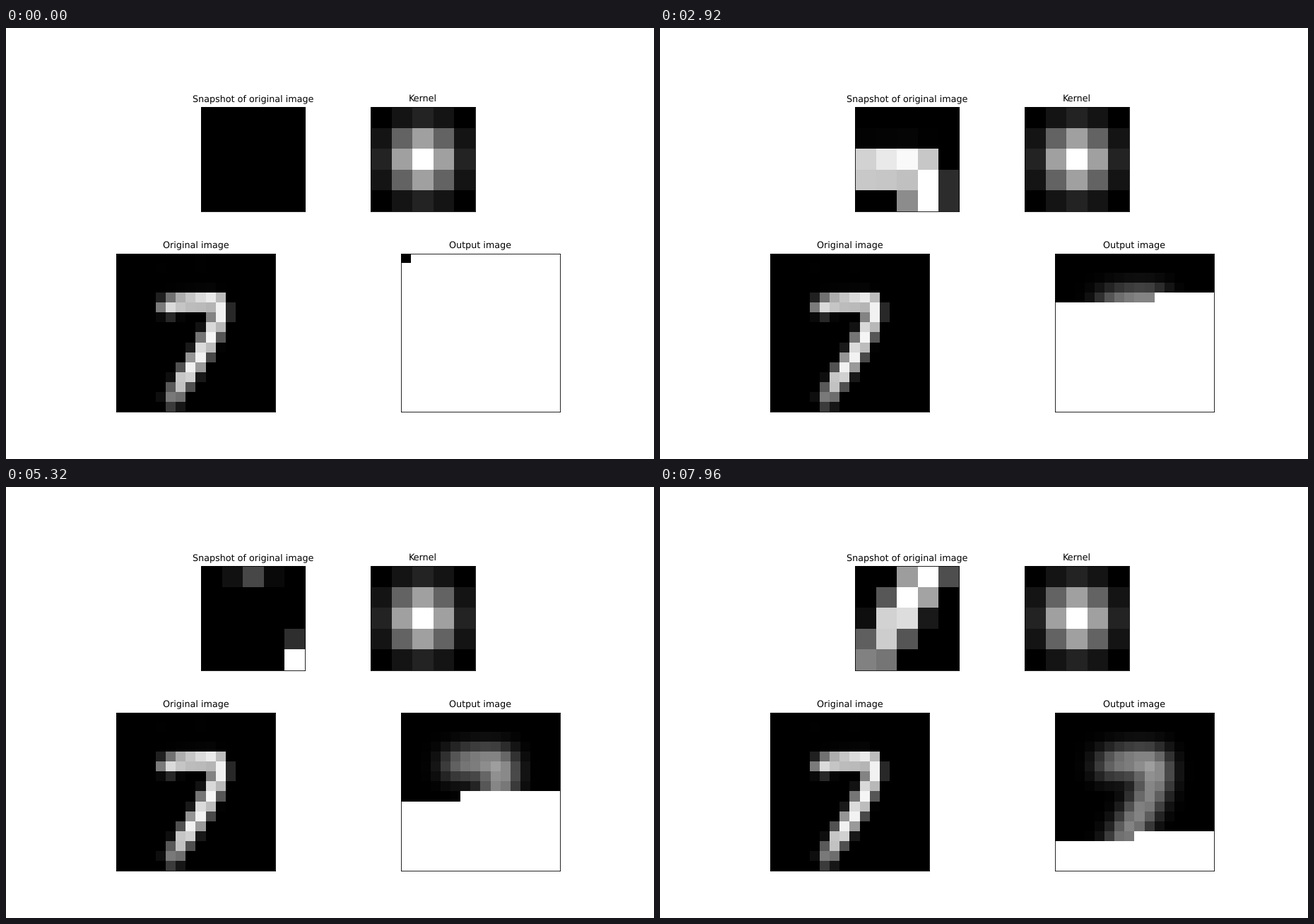
These frames come from a looping animation (917x611 px, 8000 ms). A matplotlib script:

```python
import numpy as np
import matplotlib.pyplot as plt
from matplotlib.animation import FuncAnimation

W, H, DPI = 917, 611, 64
PT = W / 12 / DPI          # scales point sizes of a 12 inch wide layout
N, FRAMES, STEP_MS = 16, 200, 40

plt.rcParams.update({
    "font.family": "DejaVu Sans",
    "axes.titlesize": 12 * PT,
    "axes.titlepad": 6.8 * PT,
    "axes.linewidth": 0.8 * PT,
    "text.hinting": "none",
})


def draw_seven():
    """A pen stroke along key points (column, row, ink) with a soft edge."""
    path = np.array([
        (4.75, 4.9, 0.9), (6.2, 4.52, 0.95), (8, 4.42, 1.05),
        (9.5, 4.35, 1.1), (9.85, 4.9, 1), (9.85, 6, 1),
        (8.95, 8, 1), (7.85, 10, 1), (6.5, 12, 1), (5.2, 14.2, 0.5),
    ])
    t = np.linspace(0, len(path) - 1, 500)
    x, y, ink = (np.interp(t, range(len(path)), k) for k in path.T)
    rows, cols = np.mgrid[:N, :N, :1][:2]
    dist2 = (cols - x) ** 2 + (rows - y) ** 2
    edge = np.clip(1 - dist2 / 1.5 ** 2, 0, 1) ** 2
    image = np.minimum((245 * ink * edge).max(axis=2), 255)
    # faint traces above the bar, seen only when a window is stretched
    image[:2, 8] = image[1, 4] = 1
    image[3, 4:10] = np.arange(6)
    return image


digit = draw_seven()
padded = np.pad(digit, 2)

bell = np.exp(-np.arange(-2, 3) ** 2 / (2 * 1.05 ** 2))
kernel = np.outer(bell, bell)
kernel /= kernel.sum()


def window(i):
    r, c = divmod(i, N)
    return padded[r:r + 5, c:c + 5]


blurred = np.array([(window(i) * kernel).sum() for i in range(N * N)])

fig = plt.figure(figsize=(W / DPI, H / DPI), dpi=DPI, facecolor="white")


def panel(title, cx, cy, size, data, vmin=None, vmax=None):
    """Square image panel centred at (cx, cy), in pixels from the top left."""
    ax = fig.add_axes([(cx - size / 2) / W, 1 - (cy + size / 2) / H,
                       size / W, size / H])
    ax.set_title(title)
    ax.set_xticks([])
    ax.set_yticks([])
    return ax.imshow(data, cmap="gray", vmin=vmin, vmax=vmax,
                     interpolation="nearest", aspect="auto")


snap = panel("Snapshot of original image", 349.6, 185.9, 147.6, window(0))
panel("Kernel", 590.2, 185.9, 147.6, kernel)
panel("Original image", 268.8, 432, 224.8, digit, 0, 255)
output = panel("Output image", 671.5, 432, 224.8, digit, 0, 255)


def update(i):
    view = window(i)
    snap.set_data(view)
    snap.set_clim(view.min(), view.max() if np.ptp(view) else view.min() + 1)
    done = np.arange(N * N) <= i
    output.set_data(np.where(done, blurred, 255).reshape(N, N))
    return snap, output


anim = FuncAnimation(fig, update, frames=FRAMES, interval=STEP_MS,
                     repeat=True, repeat_delay=0, blit=False)
plt.show()
```
